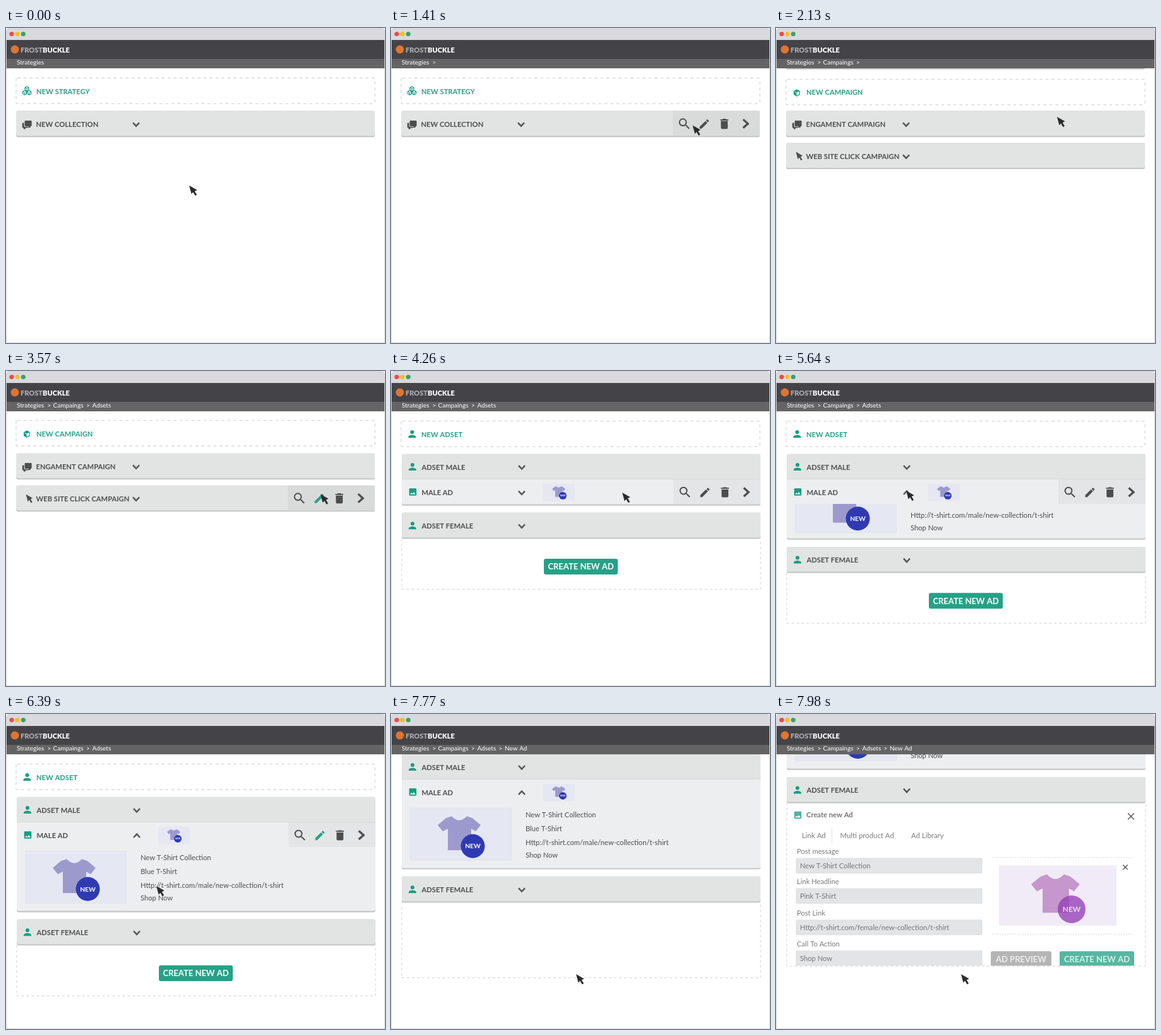
An HTML page with a canvas for the animation above (8 s loop, 600 by 500 pixels).

```html
<!DOCTYPE html>
<html lang="en">
<head>
<meta charset="utf-8">
<title>Ad manager walkthrough</title>
<style>
html, body { margin: 0; width: 100%; height: 100%; overflow: hidden; background: #fff; }
canvas { display: block; width: 600px; height: 500px; }
</style>
</head>
<body>
<canvas id="stage"></canvas>
<script>
const LOOP = 8000;
const GREEN = '#26a187', TEAL = '#169d82', INK = '#4d4d4d', ROW = '#e2e4e3';
const canvas = document.getElementById('stage');
const ctx = canvas.getContext('2d');
const dpr = window.devicePixelRatio || 1;
canvas.width = 600 * dpr;
canvas.height = 500 * dpr;

const ICONS = {
  search: new Path2D('M15.5 14h-.79l-.28-.27A6.47 6.47 0 0 0 16 9.5 6.5 6.5 0 1 0 9.5 16c1.61 0 3.09-.59 4.23-1.57l.27.28v.79l5 4.99L20.49 19zM9.5 14a4.5 4.5 0 1 1 0-9 4.5 4.5 0 0 1 0 9z'),
  pencil: new Path2D('M3 17.25V21h3.75L17.81 9.94l-3.75-3.75zM20.71 7.04a1 1 0 0 0 0-1.41l-2.34-2.34a1 1 0 0 0-1.41 0l-1.83 1.83 3.75 3.75z'),
  trash: new Path2D('M6 19a2 2 0 0 0 2 2h8a2 2 0 0 0 2-2V7H6zM19 4h-3.5l-1-1h-5l-1 1H5v2h14z'),
  person: new Path2D('M12 12a4 4 0 1 0 0-8 4 4 0 0 0 0 8zm0 2c-2.67 0-8 1.34-8 4v2h16v-2c0-2.66-5.33-4-8-4z'),
  image: new Path2D('M21 19V5a2 2 0 0 0-2-2H5a2 2 0 0 0-2 2v14a2 2 0 0 0 2 2h14a2 2 0 0 0 2-2zM8.5 13.5l2.5 3.01L14.5 12l4.5 6H5z'),
  arrow: new Path2D('M0 0L3.6 13.6 6.2 10.6 9.6 16.2 12.1 14.6 8.7 9.2 12.6 7.2Z'),
  shirt: new Path2D('M22 0Q34 13 46 0L55 3 68 14 60 24 53 20V54H16V20L8 24 0 14 13 3Z')
};

// cursor tip: time, x, y
const PATH = [
  [420, 290, 250], [1530, 500, 143], [1680, 500, 143], [2130, 445, 141],
  [2470, 404, 139.5], [3270, 498, 195.5], [3570, 498, 195.5], [5100, 206, 190],
  [5960, 206, 190], [6390, 238, 273], [7200, 293, 413]
];

const ramp = (t, start, len) => Math.min(1, Math.max(0, (t - start) / len));
const easeOut = (t, start, len, power) => 1 - Math.pow(1 - ramp(t, start, len), power);

function text(str, x, y, size, color, weight = 400, align = 'left') {
  ctx.font = `${weight} ${size}px Lato, sans-serif`;
  ctx.textAlign = align;
  ctx.fillStyle = color;
  ctx.fillText(str, x, y);
}

function box(x, y, w, h, color, r = 0) {
  ctx.fillStyle = color;
  ctx.beginPath();
  ctx.roundRect(x, y, w, h, r);
  ctx.fill();
}

function disc(x, y, r, color) {
  ctx.fillStyle = color;
  ctx.beginPath();
  ctx.arc(x, y, r, 0, 7);
  ctx.fill();
}

function line(points, color, width, dash = []) {
  ctx.strokeStyle = color;
  ctx.lineWidth = width;
  ctx.setLineDash(dash);
  ctx.beginPath();
  points.forEach(([x, y]) => ctx.lineTo(x, y));
  ctx.stroke();
  ctx.setLineDash([]);
}

function shape(path, x, y, scale, color) {
  ctx.save();
  ctx.translate(x, y);
  ctx.scale(scale, scale);
  ctx.fillStyle = color;
  ctx.fill(path);
  ctx.restore();
}

// 24-unit icon centred on a point
const icon = (name, x, y, scale, color) =>
  shape(ICONS[name], x - 12 * scale, y - 12 * scale, scale, color);

function clipped(top, bottom, draw) {
  ctx.save();
  ctx.beginPath();
  ctx.rect(0, top, 600, Math.max(0, bottom - top));
  ctx.clip();
  draw();
  ctx.restore();
}

function cube(x, y, r, solid) {
  const corner = i => [x + r * Math.sin(i * Math.PI / 3), y - r * Math.cos(i * Math.PI / 3)];
  const hex = [0, 1, 2, 3, 4, 5, 0, 1].map(corner);
  if (solid) {
    ctx.fillStyle = TEAL;
    ctx.beginPath();
    [[x, y], ...[3, 4, 5, 0, 1].map(corner)].forEach(([a, b]) => ctx.lineTo(a, b));
    ctx.fill();
    line([corner(5), [x, y], corner(1)], '#fff', 0.9);
    line([[x, y], corner(3)], '#fff', 0.9);
  }
  line(hex, TEAL, 1.2);
  if (!solid) {
    line([corner(5), [x, y], corner(1)], TEAL, 1);
    line([[x, y], corner(3)], TEAL, 1);
  }
}

function chats(x, y) {
  box(x, y + 3.5, 10, 8, INK, 1);
  box(x + 2, y + 9, 3, 4.5, INK);
  box(x + 2.8, y - 0.8, 12, 10.6, ROW, 1);
  box(x + 3.8, y, 11, 9, INK, 1.2);
  box(x + 10, y + 8, 3, 3, INK);
}

function chevron(x, y, up) {
  const d = up ? -2.7 : 2.7;
  line([[x - 5, y - d], [x, y + d], [x + 5, y - d]], '#555', 2.5);
}

function cross(x, y, r) {
  line([[x - r, y - r], [x + r, y + r]], '#444', 1.7);
  line([[x - r, y + r], [x + r, y - r]], '#444', 1.7);
}

function newBox(y, label) {
  ctx.strokeStyle = '#dcdcdc';
  ctx.lineWidth = 1.4;
  ctx.setLineDash([5, 4.5]);
  ctx.beginPath();
  ctx.roundRect(16, y, 568, 40.5, 2);
  ctx.stroke();
  ctx.setLineDash([]);
  text(label, 48, y + 25, 11.2, GREEN, 700);
}

function row(x, y, label, h = 39.5, color = ROW, shadow = true) {
  if (shadow) box(x, y, 568, h + 2.2, '#c5c8c6', 3);
  box(x, y, 568, h, color, 3);
  text(label, x === 16 ? 47.5 : 48.5, y + 25.2, 11.2, INK, 700);
}

function tools(x, y, color, active) {
  const tint = name => name === active ? GREEN : INK;
  box(x + 430, y, 138, 39, color);
  icon('search', x + 448.5, y + 20.5, 0.98, tint('search'));
  icon('pencil', x + 480, y + 20.8, 0.82, tint('pencil'));
  icon('trash', x + 511.7, y + 20.5, 0.9, tint('trash'));
  line([[x + 541.5, y + 13.5], [x + 549, y + 20.3], [x + 541.5, y + 27]], tint('next'), 3.3);
}

function button(x, y, w, label, color) {
  box(x, y, w, 25, color, 3);
  text(label, x + w / 2, y + 17.3, 13, '#fff', 700, 'center');
}

function picture(x, y, w, h, shirt, badge, colors) {
  box(x, y, w, h, colors[0]);
  shape(ICONS.shirt, x + shirt[0], y + shirt[1], shirt[2], colors[1]);
  const [bx, by, r, size] = badge;
  disc(x + bx, y + by, r, colors[2]);
  text('NEW', x + bx, y + by + size * 0.36, size, '#fff', 700, 'center');
}

const BLUE = ['#e5e8f3', '#9c9acd', '#2f3ab2'];
const PINK = ['#ece6f4', '#bb7fc0', '#943fb6'];

function strategies(dy, t) {
  newBox(79.5 + dy, 'NEW STRATEGY');
  cube(33, 96.4 + dy, 3.5);
  cube(29.6, 102.6 + dy, 3.5);
  cube(36.6, 102.6 + dy, 3.5);
  row(16, 131.6 + dy, 'NEW COLLECTION');
  chats(25.8, 147 + dy);
  chevron(206, 153 + dy);
  if (t > 1190) tools(16, 131.6 + dy, '#d9dbda', t > 1430 ? 'pencil' : '');
}

function campaigns(dy, t, lag = 0) {
  newBox(79.5 + dy + lag, 'NEW CAMPAIGN');
  cube(33, 101 + dy + lag, 5, true);
  const y = 131.6 + dy + Math.max(0, lag - 2);
  row(16, y, 'ENGAMENT CAMPAIGN');
  chats(25.8, y + 15.4);
  chevron(206, y + 21.4);
  row(16, y + 51, 'WEB SITE CLICK CAMPAIGN');
  shape(ICONS.arrow, 31.5, y + 65, 0.85, INK);
  chevron(206, y + 72.4);
  if (t > 3080) tools(16, y + 51, '#d9dbda', t > 3180 ? 'pencil' : '');
}

function details(y) {
  picture(30.5, y, 160, 83, [43.5, 13, 1], [99, 60.5, 19, 10.3], BLUE);
  ctx.strokeStyle = '#dde0ea';
  ctx.lineWidth = 0.7;
  ctx.strokeRect(30.5, y, 160, 83);
  text('New T-Shirt Collection', 213, y + 15, 11.2, INK);
  text('Blue T-Shirt', 213, y + 36.5, 11.2, INK);
  text('Http://t-shirt.com/male/new-collection/t-shirt', 213, y + 59, 11.2, INK);
  text('Shop Now', 213, y + 79, 11.2, INK);
}

function field(label, value, y) {
  text(label, 33, y - 6, 11.2, '#555');
  box(31.5, y, 295, 24.5, '#d2d4d6', 2);
  box(32.3, y + 0.8, 293.4, 22.9, '#e5e7e8', 1.5);
  text(value, 38, y + 16.3, 11.2, '#555');
}

function adForm(y, alpha) {
  ctx.globalAlpha = alpha;
  icon('image', 34.5, y + 60.5, 0.63, TEAL);
  text('Create new Ad', 48, y + 64.5, 11.2, INK, 700);
  cross(562, y + 62.5, 4.8);
  text('Link Ad', 41, y + 97.5, 11.4, '#555');
  text('Multi product Ad', 101.5, y + 97.5, 11.4, '#555');
  text('Ad Library', 214, y + 97.5, 11.4, '#555');
  line([[88.5, y + 80], [88.5, y + 105]], '#d8d8d8', 1);
  field('Post message', 'New T-Shirt Collection', y + 128.5);
  field('Link Headline', 'Pink T-Shirt', y + 176.5);
  field('Post Link', 'Http://t-shirt.com/female/new-collection/t-shirt', y + 226.5);
  field('Call To Action', 'Shop Now', y + 275.5);
  line([[342, y + 128], [566, y + 128]], '#ccc', 1, [2, 2]);
  line([[342, y + 249.5], [566, y + 249.5]], '#ccc', 1, [2, 2]);
  picture(353, y + 140.5, 186, 95.5, [51, 14, 1.13], [115, 69.5, 22, 11.9], PINK);
  cross(553, y + 143.2, 3.8);
  button(340, y + 276.5, 96, 'AD PREVIEW', '#a0a0a0');
  button(449, y + 276.5, 118, 'CREATE NEW AD', GREEN);
  ctx.globalAlpha = 1;
}

function activeTool(t) {
  if (t < 6180 || t >= 6970) return '';
  return ['search', 'pencil', 'trash', 'next'][Math.min(3, Math.floor((t - 6150) / 205))];
}

function adsets(dy, t) {
  const open = easeOut(t, 5370, 780, 1.8);
  const grow = 101 * open;
  newBox(79.5 + dy, 'NEW ADSET');
  icon('person', 33.5, 100 + dy, 0.75, TEAL);

  row(17, 131.5 + dy, 'ADSET MALE', 41, ROW, false);
  icon('person', 34, 152 + dy, 0.75, TEAL);
  chevron(207, 152.8 + dy);

  row(17, 171.8 + dy, 'MALE AD', 39.7 + grow, '#edeef0');
  box(17, 171 + dy, 568, 0.9, '#d6d8d8');
  if (open > 0) clipped(211 + dy, 312 + dy, () => details(217.3 + dy - 94 * (1 - open)));
  icon('image', 34.5, 192 + dy, 0.64, TEAL);
  chevron(207, 193.3 + dy, open > 0);
  picture(241, 179 + dy, 50, 27.5, [14, 4, 0.31], [31, 19, 6, 3.6], BLUE);
  if (t > 3700 && t < 7080) tools(17, 172 + dy, '#e4e5e7', activeTool(t));

  const y = 224.8 + dy + grow;
  const height = 80.5 + (t > 7620 ? 39 * Math.pow((t - 7620) / 150, 1.733) : 0);
  const top = y + 41, bottom = top + height;
  line([[17, top], [17, bottom], [585, bottom], [585, top]], '#d9d9d9', 1.2, [4, 4]);
  row(17, y, 'ADSET FEMALE');
  icon('person', 34, y + 20.5, 0.75, TEAL);
  chevron(207, y + 21.4);
  if (t < 7720) {
    ctx.globalAlpha = 1 - ramp(t, 7620, 90);
    button(242, y + 73.3, 117, 'CREATE NEW AD', GREEN);
    ctx.globalAlpha = 1;
  }
  if (t > 7780) clipped(top, bottom - 0.6, () => adForm(y, ramp(t, 7780, 260)));
}

function content(t) {
  if (t < 2470) {
    const p = easeOut(t, 1680, 780, 4.67), shift = 109.5 * p;
    strategies(-shift, t);
    if (p > 0) clipped(174 - shift, 174 + 51 * p, () => campaigns(0, t, 109.5 - shift));
  } else if (t < 3570) {
    campaigns(0, t);
  } else if (t < 4350) {
    const p = easeOut(t, 3570, 780, 4.67), shift = 162 * p;
    campaigns(-shift, t);
    clipped(225 - shift, 225 + 123 * p, () => adsets(162 - shift, t));
  } else {
    adsets(t > 7620 ? -67.5 * Math.pow((t - 7620) / 150, 1.375) : 0, t);
  }
}

function crumbs(t) {
  const crumb = (str, x) => text(str, x, 58, 10, '#fff');
  crumb('Strategies', 17);
  ctx.globalAlpha = ramp(t, 1080, 420);
  crumb('>', 65.5);
  ctx.globalAlpha = 1;
  if (t >= 1680) { crumb('Campaings', 74.5); crumb('>', 127); }
  if (t >= 3570) crumb('Adsets', 136.5);
  if (t >= 7620) { crumb('>', 170.5); crumb('New Ad', 180); }
}

function chrome(t) {
  box(0, 0, 600, 19, '#d9d9de', [5, 5, 0, 0]);
  disc(9, 9.5, 3.6, '#ee4b42');
  disc(18, 9.5, 3.6, '#f5bf1d');
  disc(27.3, 9.5, 3.6, '#37a366');
  box(1, 19, 598, 30, '#444348');
  box(1, 49, 598, 15, '#646464');
  disc(14, 34, 6.5, '#e0742e');
  text('FROST', 23, 38.5, 11, '#a9a9ab', 900);
  const w = ctx.measureText('FROST').width;
  text('BUCKLE', 23 + w, 38.5, 11, '#fff', 900);
  crumbs(t);
  line([[0.5, 19], [0.5, 499.5], [599.5, 499.5], [599.5, 19]], '#d6d6da', 1);
}

function cursor(t) {
  let i = 0;
  while (i < PATH.length - 2 && t > PATH[i + 1][0]) i++;
  const [t0, x0, y0] = PATH[i], [t1, x1, y1] = PATH[i + 1];
  const p = ramp(t, t0, t1 - t0);
  shape(ICONS.arrow, x0 + (x1 - x0) * p, y0 + (y1 - y0) * p, 1, '#2b2b2b');
}

function draw(now) {
  const t = now % LOOP;
  ctx.setTransform(dpr, 0, 0, dpr, 0, 0);
  ctx.fillStyle = '#fff';
  ctx.fillRect(0, 0, 600, 500);
  content(t);
  chrome(t);
  cursor(t);
}

const start = performance.now();
function tick() {
  draw(performance.now() - start);
  requestAnimationFrame(tick);
}
tick();
</script>
</body>
</html>
```
